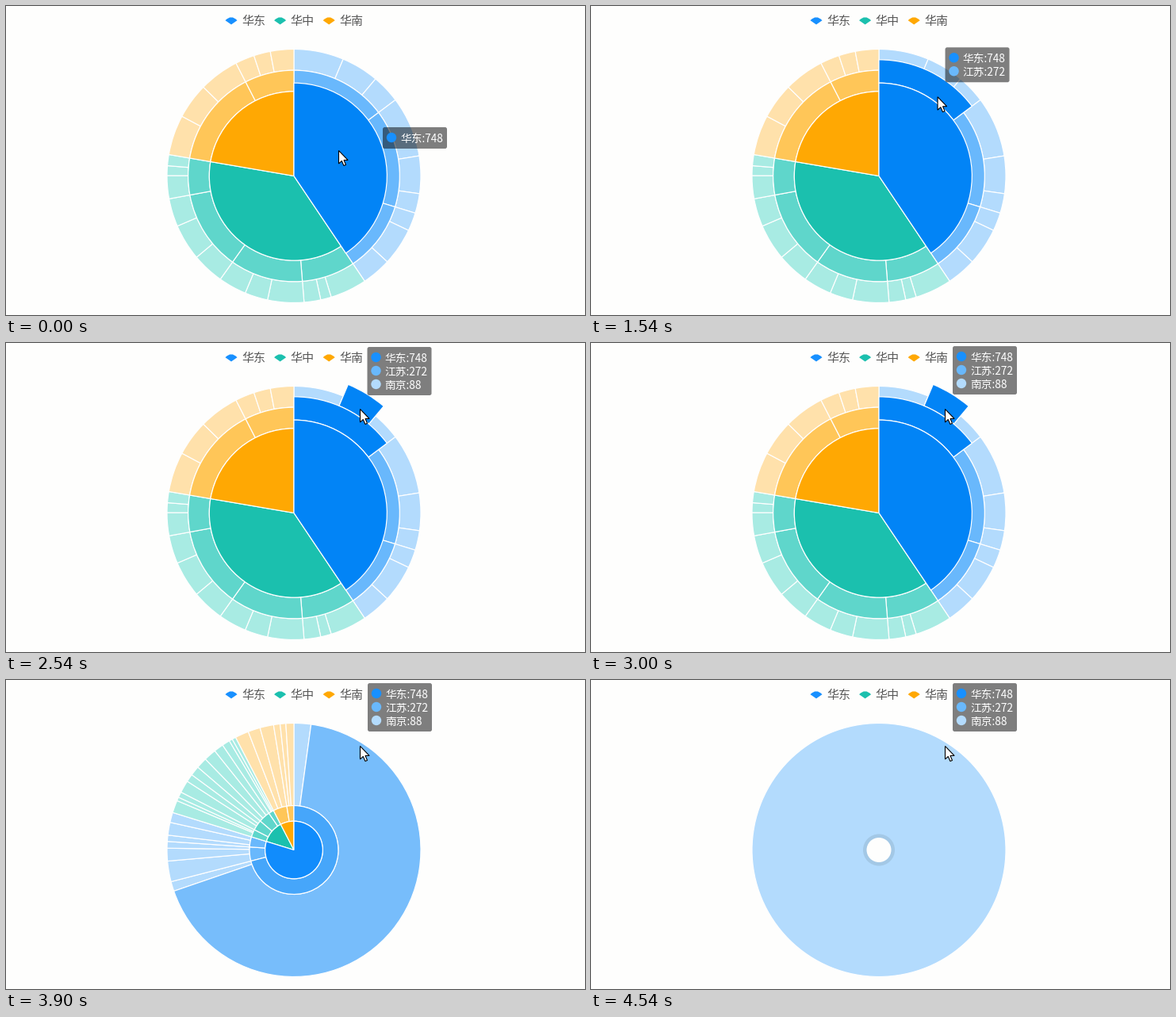
These frames come from a looping animation (730x390 px, 5.18 s). A matplotlib script:

```python
import numpy as np
import matplotlib.pyplot as plt
from matplotlib.animation import FuncAnimation
from matplotlib.patches import Circle, FancyBboxPatch, PathPatch, Polygon, Wedge
from matplotlib.path import Path

W, H, DPI = 730, 390, 100
PX = 72 / DPI
LOOP, INTERVAL, RATE = 5180, 20, 11
CENTER, RADIUS = (363, 214.5), 160
BACKGROUND, HOVER = "#fefefd", "#0284f6"
FONT = "Noto Sans CJK JP"

# Colours by level, then leaf values grouped by second-level node.
REGIONS = [
    ("华东", ("#1890ff", "#69b8fc", "#b3dbfd"),
     [[117, 88, 67], [142, 88, 46], [43, 88, 69]]),
    ("华中", ("#1bc0ae", "#5fd6cb", "#a8ebe3"),
     [[86, 25, 39], [85, 54, 66], [75, 85, 66], [54, 23, 26]]),
    ("华南", ("#ffa803", "#ffc658", "#ffe1ab"),
     [[94, 84, 94], [45, 39, 55]]),
]
TOOLTIP_ROWS = ["华东:748", "江苏:272", "南京:88"]
RINGS = np.array([0, 2 / 3, 5 / 6, 1]) * RADIUS
DRILLED_RINGS = np.array([0, 0, 0.1, 1]) * RADIUS

HOVER_TIMES = [-1000, 650, 2046]         # pointer reaches level 1, 2, 3
HOVER_MS = 300
DRILL_START, DRILL_MS = 3377, 950

# time, x, y
CURSOR_KEYS = np.array([
    (636, 419, 182), (727, 439, 120), (818, 441, 117), (1450, 441, 117),
    (1900, 420, 104), (2000, 420, 104), (2182, 445, 87), (2540, 446, 83)])
TOOLTIP_KEYS = np.array([
    (636, 475, 153), (818, 448, 88), (1180, 451, 55), (1450, 451, 55),
    (1900, 430, 42), (2000, 430, 42), (2182, 437, 28), (2450, 455, 6),
    (2640, 456, 4)])
ARROW = np.array([(0, 0), (0, 16.5), (3.8, 13), (6.4, 19), (9, 17.9),
                  (6.5, 12), (11.6, 12)])


def rgb(color):
    return np.array(plt.matplotlib.colors.to_rgb(color))


def mix(a, b, p):
    return a + (b - a) * p


def cubic_out(t):
    return 1 - (1 - np.clip(t, 0, 1)) ** 3


def cubic_in_out(t):
    t = np.clip(t, 0, 1)
    return 4 * t ** 3 if t < 0.5 else 1 - 4 * (1 - t) ** 3


def position(keys, t):
    return tuple(np.interp(t, keys[:, 0], keys[:, k]) for k in (1, 2))


fig = plt.figure(figsize=(W / DPI, H / DPI), dpi=DPI, facecolor=BACKGROUND)
ax = fig.add_axes([0, 0, 1, 1])
ax.set(xlim=(0, W), ylim=(H, 0))
ax.axis("off")


def label(x, y, text, size, color, z):
    return ax.text(x, y, text, fontsize=size * PX, color=color, family=FONT,
                   ha="left", va="baseline", zorder=z)


class Node:
    def __init__(self, level, start, end, color, focused):
        self.level, self.start, self.end = level, start, end
        self.color, self.focused = rgb(color), focused
        self.wedge = Wedge(CENTER, 1, 0, 90, ec="white", lw=1.2 * PX)
        ax.add_patch(self.wedge)

    def update(self, hovered, grow, drill):
        lit = self.focused and self.level < hovered
        rings = mix(RINGS, DRILLED_RINGS, drill)
        inner, outer = rings[self.level:self.level + 2]
        if lit:
            inner, outer = inner * (1 + 0.1 * grow), outer * (1 + 0.1 * grow)
        start, end = (mix(a, 0 if a < FOCUS_END else 360, drill)
                      for a in (self.start, self.end))
        visible = end - start > 0.05 and outer - inner > 0.5
        self.wedge.set_visible(visible and (drill < 1 or self.level == 2))
        if not visible:
            return
        self.wedge.set(radius=outer, width=outer - inner,
                       theta1=start - 90, theta2=end - 90,
                       fc=mix(rgb(HOVER), self.color, drill) if lit else self.color,
                       zorder=5 - self.level if lit else 1)


TOTAL = sum(sum(map(sum, groups)) for _, _, groups in REGIONS)
DEGREE = 360 / TOTAL
FOCUS_END = (117 + 88 / 2) * DEGREE      # edges before this fold to the start


def build_nodes():
    nodes, angle = [], 0
    for i, (_, colors, groups) in enumerate(REGIONS):
        region_start = angle
        for j, leaves in enumerate(groups):
            group_start = angle
            for k, value in enumerate(leaves):
                span = value * DEGREE
                nodes.append(Node(2, angle, angle + span, colors[2],
                                  (i, j, k) == (0, 0, 1)))
                angle += span
            nodes.append(Node(1, group_start, angle, colors[1], i == j == 0))
        nodes.append(Node(0, region_start, angle, colors[0], i == 0))
    return nodes


def draw_legend():
    for i, (name, colors, _) in enumerate(REGIONS):
        x = 284 + 61.6 * i
        fan = Path([(x - 7.5, 18.2), (x, 10.2), (x + 7.5, 18.2), (x, 23.4),
                    (x - 7.5, 18.2)],
                   [Path.MOVETO, Path.CURVE3, Path.CURVE3, Path.LINETO,
                    Path.CLOSEPOLY])
        ax.add_patch(PathPatch(fan, fc=colors[0], ec="none"))
        label(x + 12.8, 24.2, name, 15, "#595959", 1)


draw_legend()
nodes = build_nodes()

back_button = [
    ax.add_patch(Circle(CENTER, 20, fc="#a3c8e6", ec="none", zorder=6)),
    ax.add_patch(Circle(CENTER, 15.5, fc=BACKGROUND, ec="none", zorder=7)),
]
tooltip = FancyBboxPatch((0, 0), 81, 27, fc=(0, 0, 0, 0.5), ec="none", zorder=8,
                         boxstyle="round,pad=0,rounding_size=2.5")
ax.add_patch(tooltip)
rows = [(ax.add_patch(Circle((0, 0), 6.2, fc=color, ec="none", zorder=9)),
         label(0, 0, text, 13.7, "white", 9))
        for color, text in zip(REGIONS[0][1], TOOLTIP_ROWS)]
cursor = Polygon(ARROW, fc="white", ec="black", lw=1.1 * PX, zorder=10)
ax.add_patch(cursor)


def update(frame):
    step = int((frame * INTERVAL + 19) * RATE / 1000)
    t = step * 1000 / RATE
    hovered = sum(t >= start for start in HOVER_TIMES)
    drill = cubic_in_out((t - DRILL_START) / DRILL_MS)
    grow = cubic_out((t - HOVER_TIMES[hovered - 1]) / HOVER_MS)
    if t >= DRILL_START:
        grow = 0
    for node in nodes:
        node.update(hovered, grow, drill)
    for part in back_button:
        part.set_visible(drill >= 1)

    x, y = position(TOOLTIP_KEYS, t)
    tooltip.set_bounds(x, y, 81, 10 + 17 * hovered)
    for i, (dot, text) in enumerate(rows):
        middle = y + 13.7 + 17 * i
        dot.set(center=(x + 11, middle - 0.7), visible=i < hovered)
        text.set(position=(x + 22, middle + 5.2), visible=i < hovered)
    cursor.set_xy(ARROW + position(CURSOR_KEYS, t) + np.array([0.5, 0.5]))
    return []


anim = FuncAnimation(fig, update, frames=LOOP // INTERVAL, interval=INTERVAL,
                     init_func=lambda: [], repeat=True, repeat_delay=0,
                     blit=False)
plt.show()
```
